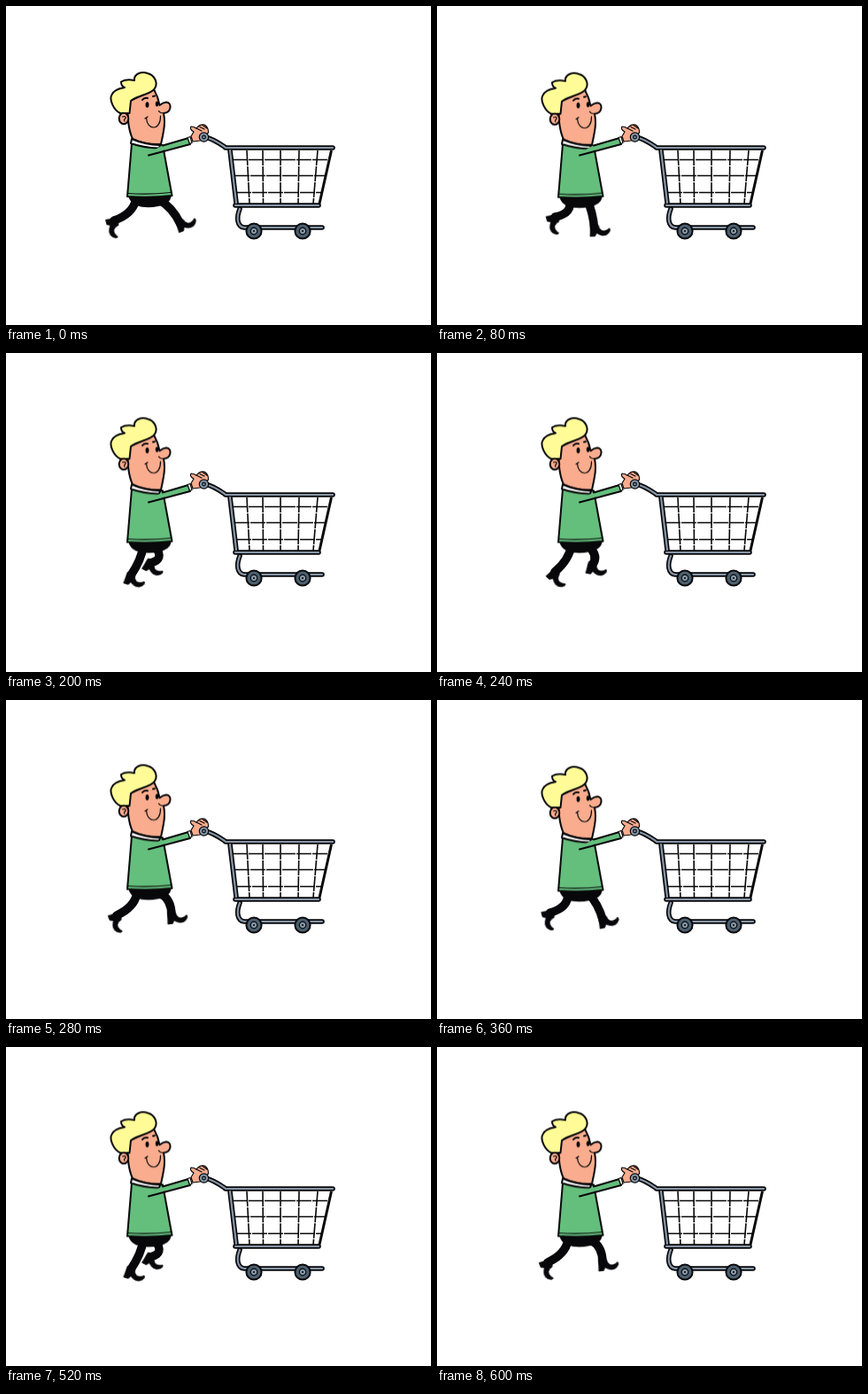
Animation, 480 px wide and 360 px high, one loop 0.64 s. Source, as an HTML page without scripts:

```html
<!DOCTYPE html>
<html lang="en">
<head>
<meta charset="utf-8">
<title>Shopping walk</title>
<style>
html, body { margin: 0; width: 100%; height: 100%; overflow: hidden; background: #fff; }
svg { display: block; width: 100vw; height: 100vh; }

.ink { stroke: #08080a; stroke-width: 2; stroke-linecap: round; stroke-linejoin: round; }
.fine { stroke-width: 1.2; }
.line { fill: none; }
.skin { fill: #f9ac8e; }
.hair { fill: #fffc97; }
.knit { fill: #64be7c; }
.white { fill: #fff; }
.steel { fill: #8496a6; }
.tyre { fill: #4c6070; }
.tube { fill: none; stroke-linecap: round; stroke-linejoin: round; }
.edge { stroke: #08080a; stroke-width: 5.6; }
.core { stroke: #8796a8; stroke-width: 2.2; }
.brace { stroke: #08080a; stroke-width: 3; }
.wire { fill: none; stroke: #08080a; stroke-width: 1.6; stroke-dasharray: 17 1; }
.leg { fill: none; stroke: #08080a; stroke-width: 9.5; stroke-linecap: round; }
.shoe { fill: #08080a; stroke: #08080a; stroke-width: .8; stroke-linejoin: round; }

/* One step lasts 320 ms and is held in 40 ms poses. */
.bob, .leg, .shoe { animation: 320ms infinite; }
.bob { animation-name: bob; }
.stance .leg { animation-name: stance-leg; }
.stance .shoe { animation-name: stance-shoe; }
.swing .leg { animation-name: swing-leg; }
.swing .shoe { animation-name: swing-shoe; }

@keyframes bob {
  0% { transform: translateY(0); animation-timing-function: steps(3); }
  37.5% { transform: translateY(1px); animation-timing-function: steps(2); }
  62.5%, 87.5% { transform: translateY(-1.6px); animation-timing-function: steps(1); }
  100% { transform: translateY(0); }
}
@keyframes stance-leg {
  0% { d: path("M172 218Q188 227 197 246"); animation-timing-function: steps(3); }
  37.5% { d: path("M168 218Q170 235 168 253"); animation-timing-function: steps(2); }
  62.5% { d: path("M155 218Q153 233 141 251"); animation-timing-function: steps(2); }
  87.5% { d: path("M148 218Q145 234 125 243"); animation-timing-function: steps(1); }
  100% { d: path("M147 218Q143 235 122 242"); }
}
@keyframes stance-shoe {
  0% { transform: translate(197px, 246px) rotate(-22deg); animation-timing-function: steps(3); }
  37.5% { transform: translate(168px, 254px) rotate(8deg); animation-timing-function: steps(2); }
  62.5% { transform: translate(140px, 253px) rotate(17deg); animation-timing-function: steps(2); }
  87.5% { transform: translate(125px, 245px) rotate(68deg); animation-timing-function: steps(1); }
  100% { transform: translate(122px, 244px) rotate(75deg); }
}
@keyframes swing-leg {
  0% { d: path("M147 218Q143 235 122 242"); animation-timing-function: steps(3); }
  37.5% { d: path("M150 218Q160 233 139 236"); animation-timing-function: steps(2); }
  62.5% { d: path("M168 218Q180 233 163 237"); animation-timing-function: steps(2); }
  87.5% { d: path("M174 218Q187 225 187 243"); animation-timing-function: steps(1); }
  100% { d: path("M172 218Q188 227 197 246"); }
}
@keyframes swing-shoe {
  0% { transform: translate(122px, 244px) rotate(75deg); animation-timing-function: steps(3); }
  37.5% { transform: translate(138px, 238px) rotate(72deg); animation-timing-function: steps(2); }
  62.5% { transform: translate(162px, 238px) rotate(28deg); animation-timing-function: steps(2); }
  87.5% { transform: translate(187px, 244px) rotate(-5deg); animation-timing-function: steps(1); }
  100% { transform: translate(197px, 246px) rotate(-22deg); }
}
</style>
</head>
<body>
<svg viewBox="0 0 480 360">
  <defs>
    <path id="shoe" d="M-4-5L4.5-4Q6 3 11 3Q15 2 17 0Q19 2 16 5.5Q13 8.5 9 8Q5 7 2.5 5L.5 8.5H-5Z"/>
    <path id="brace" d="M367.5 163L354 223"/>
    <g id="tubes">
      <path d="M264 229C260 239 261 249 269 250H357"/>
      <path d="M253 163L260 222"/>
      <path d="M259 225H353"/>
      <path d="M225 148Q234 150 247 159"/>
      <path d="M248 160H369"/>
    </g>
    <g id="wheel">
      <circle class="ink tyre" r="8.6"/>
      <circle class="ink fine steel" r="3.8"/>
      <circle r="1"/>
    </g>
  </defs>

  <!-- Cart -->
  <g class="wire">
    <path d="M256 173.5H365"/>
    <path d="M258 191.5H361"/>
    <path d="M260 210.5H357"/>
    <path d="M272 163L275 223"/>
    <path d="M290 163L290.5 223"/>
    <path d="M310 163V223"/>
    <path d="M331 163L330 223"/>
    <path d="M352 163L347 223"/>
  </g>
  <use class="brace" href="#brace"/>
  <use class="tube edge" href="#tubes"/>
  <use class="tube core" href="#tubes"/>
  <use href="#wheel" x="280" y="254"/>
  <use href="#wheel" x="335" y="254"/>

  <!-- Legs -->
  <g class="swing">
    <path class="leg" d="M147 218Q143 235 122 242"/>
    <use class="shoe" href="#shoe"/>
  </g>
  <g class="stance">
    <path class="leg" d="M172 218Q188 227 197 246"/>
    <use class="shoe" href="#shoe"/>
  </g>

  <!-- Head and torso -->
  <g class="bob">
    <path fill="#08080a" d="M138 214H187Q185 224 172 226Q158 229 147 225Q140 222 138 214Z"/>
    <path class="ink knit" d="M142 155L137 215Q162 217 187.5 214L177 157Q160 160 142 155Z"/>
    <path class="ink fine line" d="M138 211.5Q162 213 186 210.5"/>
    <path class="ink skin" d="M138 108Q136 135 143 150Q158 157 175 156Q177 147 178 141Q180 130 178 121C187 120 188 109 181 108.5Q177 109 173.5 112Q172 103 167 94Z"/>
    <path class="ink fine line" d="M178 121Q174 121 172.5 118.5"/>
    <path class="ink white" d="M142 150Q157 156.5 174 157L173 160.5Q155 160 141 155Z"/>
    <path class="ink hair" d="M129 121C121 117 117 106 119 101C121 95 127 93 134 92C131 91 130 88 130 85.5C135 82.5 140 83 145 84C144 77 153 73 160 76C168 78 172 87 168 93C164 100 150 100 141 107L139.5 121Z"/>
    <ellipse class="ink skin" cx="133" cy="127" rx="5.3" ry="6.3"/>
    <path class="ink fine line" d="M131.5 125Q136 123.5 135 127Q132.500 128 134 130"/>
    <ellipse cx="159.500" cy="111.500" rx="1.9" ry="3.2"/>
    <ellipse cx="170.500" cy="110.500" rx="1.7" ry="3"/>
    <path class="ink line" d="M154 106Q156 103 160 104M166 102L168 101.500"/>
    <path class="ink fine line" d="M158.500 126C159 141 175 141 174.500 124M157 127L160 125"/>
  </g>

  <!-- Arm and hand -->
  <path class="knit" d="M160 167L177 157L206 149L208 156Z"/>
  <path class="ink line" d="M177 157.5L206 149L208 156L161 168.5"/>
  <path class="ink fine white" d="M205 148.5L208 147.5L210 154.5L207.5 155.5Z"/>
  <path class="ink fine skin" d="M209 147L212 142Q207 139 209 136Q212 136 215 138Q219 133 224 134Q229 137 228.500 143L219 152L211 153Z"/>
  <path class="ink fine line" d="M219 136.500L224 139M222 134.500L227 138M215 138L221 141"/>
  <circle class="ink fine steel" cx="223.500" cy="148" r="5.2"/>
  <circle class="ink fine line" cx="223.500" cy="148" r="1.8"/>
</svg>
</body>
</html>
```
